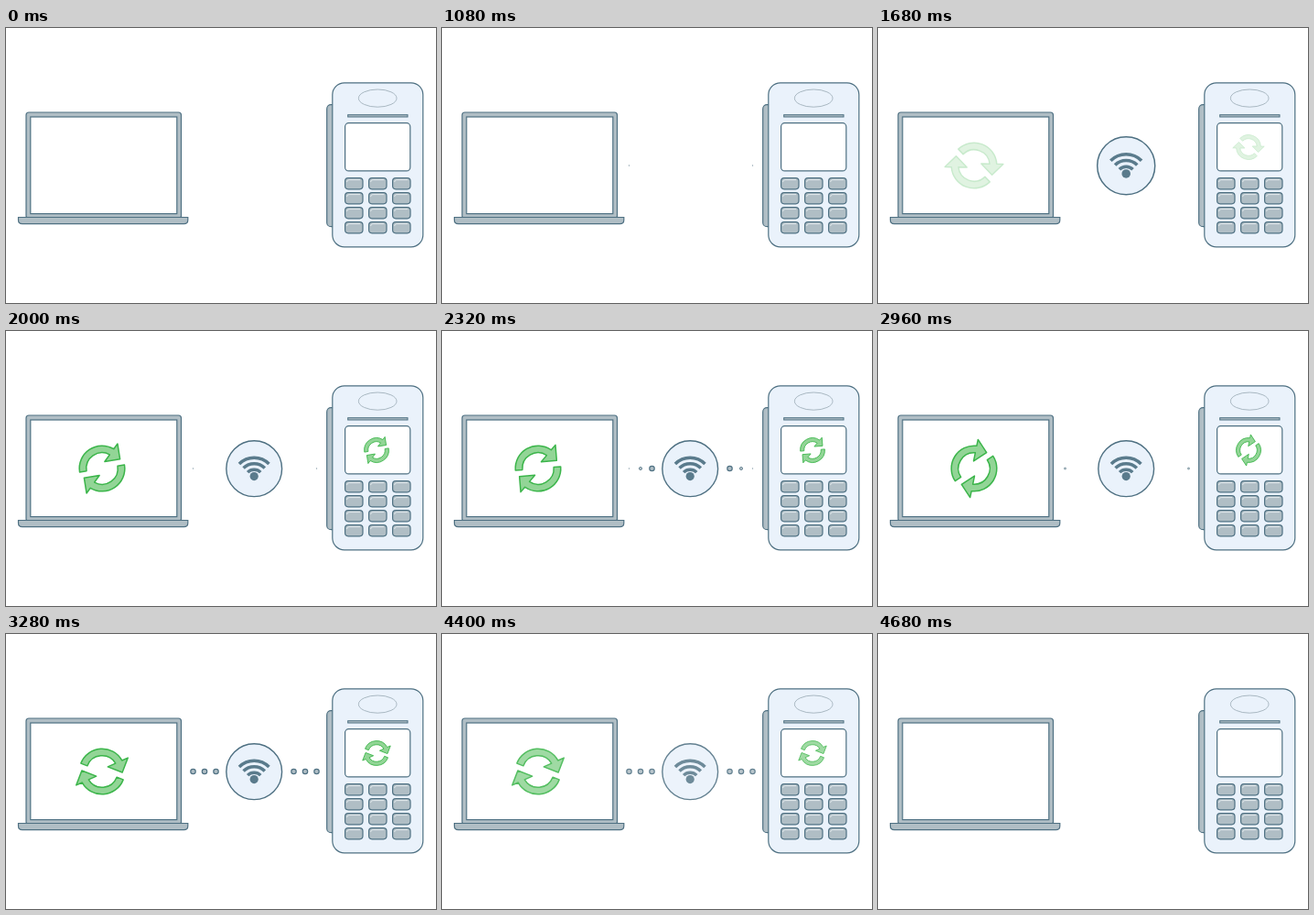
Write an HTML page that moves like this. It is 470 px wide and 300 px high and loops after 5 s.

```html
<!DOCTYPE html>
<html lang="en">
<head>
<meta charset="utf-8">
<title>Device sync</title>
<style>
  html, body { margin: 0; width: 100%; height: 100%; overflow: hidden; background: #fff; }
  svg { display: block; width: 100vw; height: 100vh; }
  .edge { stroke: #4e7082; stroke-width: 1.2; }
  .grey { fill: #b0bec5; }
  .pale { fill: #eaf2fb; }
  .white { fill: #fff; }
  .arrow { fill: #92d596; stroke: #3bb54a; stroke-width: 1.5; stroke-linejoin: round; }
  .wave { fill: none; stroke: #5a7b8c; stroke-width: 3.5; }
</style>
</head>
<body>
<svg viewBox="0 0 470 300">
  <defs>
    <path id="arrow" class="arrow"/>
    <g id="sync">
      <use href="#arrow"/>
      <use href="#arrow" transform="rotate(180)"/>
    </g>
  </defs>

  <g class="edge">
    <rect class="grey" x="22" y="92" width="169.5" height="116" rx="3"/>
    <rect class="white" x="26.8" y="97" width="160" height="105.6"/>
    <path class="grey" d="M13.5 206.5H198.8V209.5Q198.8 213.6 194.5 213.6H17.8Q13.5 213.6 13.5 209.5Z"/>
  </g>

  <g class="edge">
    <rect class="grey" x="350.7" y="83.7" width="14" height="133" rx="4.5"/>
    <rect class="pale" x="356.8" y="59.8" width="99" height="179" rx="13"/>
    <ellipse cx="406.2" cy="76.6" rx="20.8" ry="9.6" fill="none" style="stroke:#a9b8c2;stroke-width:1"/>
    <rect class="grey" x="373.7" y="94.7" width="65.3" height="2.3" style="stroke-width:1"/>
    <rect class="white" x="370.6" y="103.7" width="71.2" height="52.2" rx="4"/>
    <g id="keys"></g>
  </g>

  <g id="live">
    <g id="dots"></g>
    <g id="hub">
      <circle class="pale edge" r="30.4" style="stroke-width:1.4"/>
      <g id="waves"></g>
      <circle cy="8.4" r="4.6" fill="#5a7b8c"/>
    </g>
    <use href="#sync" class="icon" data-place="translate(105 150)"/>
    <use href="#sync" class="icon" data-place="translate(405 130) scale(.54)"/>
  </g>
</svg>
<script>
const LOOP = 5000, STEP = 40, TILT = -24;
const $ = id => document.getElementById(id);
const clamp = v => Math.min(1, Math.max(0, v));
const span = (t, from, to) => clamp((t - from) / (to - from));

function add(parent, tag, attrs) {
  const el = document.createElementNS("http://www.w3.org/2000/svg", tag);
  for (const key in attrs) el.setAttribute(key, attrs[key]);
  return parent.appendChild(el);
}

// Curved arrow: a band from the upper left, with its head on the right.
function arrowPath(outer, inner) {
  const at = (r, deg) => {
    const a = deg * Math.PI / 180;
    return `${(r * Math.cos(a)).toFixed(2)} ${(r * Math.sin(a)).toFixed(2)}`;
  };
  return `M${at(outer, 225)}A${outer} ${outer} 0 0 1 ${at(outer, 355)}` +
    `L31.8 -2.1L19.8 9.9L7.8 -2.1L${at(inner, 353)}` +
    `A${inner} ${inner} 0 0 0 ${at(inner, 225)}Z`;
}
$("arrow").setAttribute("d", arrowPath(24.8, 17.2));

for (let i = 0; i < 12; i++) {
  const x = 370.6 + (i % 3) * 26, y = 163.6 + Math.floor(i / 3) * 16;
  add($("keys"), "rect", { class: "grey", x, y, width: 19.4, height: 12.2, rx: 3.5 });
  add($("keys"), "path", {
    d: `M${x + 2} ${y + 4.5}Q${x + 2} ${y + 2} ${x + 4.5} ${y + 2}H${x + 16.5}`,
    fill: "none", style: "stroke:#e3eaee;stroke-width:1"
  });
}

for (const r of [10, 16.5, 23]) {
  const k = r * Math.SQRT1_2;
  add($("waves"), "path", { class: "wave", d: `M${-k} ${11 - k}A${r} ${r} 0 0 1 ${k} ${11 - k}` });
}

// Three dots on each side, counted from the device towards the hub.
const dots = [];
for (const side of [-1, 1]) {
  for (let i = 0; i < 3; i++) {
    const el = add($("dots"), "circle", { class: "grey edge", r: 2.7 });
    dots.push({ el, i, x: 272 + side * (67.5 - i * 12.5) });
  }
}
const icons = [...document.querySelectorAll(".icon")];

function show(el, place, scale) {
  el.setAttribute("transform", `${place} scale(${scale})`);
  el.setAttribute("visibility", scale > 0 ? "inherit" : "hidden");
}

function dotScale(t, i) {
  const delay = i * 80;
  const pulse = start => clamp(1 - Math.abs(t - start - delay - 200) / 200);
  return Math.max(pulse(1040), pulse(1960), span(t - delay, 2880, 3080));
}

function hubScale(t) {
  return 1.15 * span(t, 1320, 1560) - 0.15 * span(t, 1560, 1720);
}

// Cubic easing with flat ends and handles at 1/3 and 0.64.
function ease(x) {
  let lo = 0, hi = 1;
  for (let n = 0; n < 24; n++) {
    const s = (lo + hi) / 2, u = 1 - s;
    if (s * u * u + 1.92 * s * s * u + s * s * s < x) lo = s; else hi = s;
  }
  return lo * lo * (3 - 2 * lo);
}

function draw(t) {
  $("live").setAttribute("opacity", 1 - span(t, 4360, 4680));
  for (const { el, i, x } of dots) show(el, `translate(${x} 150)`, dotScale(t, i));
  show($("hub"), "translate(271.2 150.2)", hubScale(t));

  const turn = TILT + 720 * ease(span(t, 1480, 3280));
  for (const icon of icons) {
    icon.setAttribute("transform", `${icon.dataset.place} rotate(${turn})`);
    icon.setAttribute("opacity", span(t, 1560, 2000));
  }
}

const begin = performance.now();
function tick() {
  const t = (performance.now() - begin) % LOOP;
  draw(Math.floor(t / STEP) * STEP);
  requestAnimationFrame(tick);
}
tick();
</script>
</body>
</html>
```
